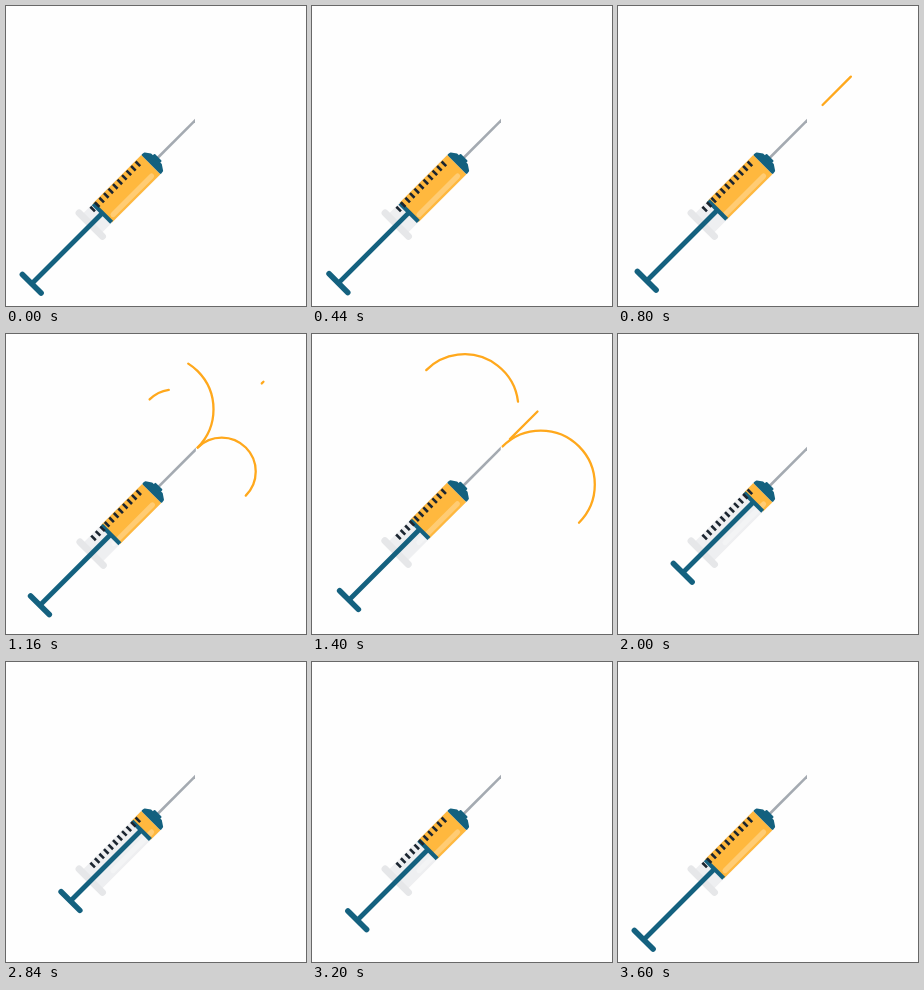
These frames come from a looping animation (300x300 px, 4.08 s). An HTML page with a canvas:

```html
<!DOCTYPE html>
<html lang="en">
<head>
<meta charset="utf-8">
<title>Syringe</title>
<style>
html, body { margin: 0; width: 100%; height: 100%; overflow: hidden; background: #fefefe; }
canvas { display: block; width: 300px; height: 300px; }
</style>
</head>
<body>
<canvas id="stage" width="300" height="300"></canvas>
<script>
const ctx = document.getElementById('stage').getContext('2d');
const LOOP = 4080, STEP = 40;
const TEAL = '#14617f', LIQUID = '#ffb83e', JET = '#ffa81c', INK = '#1b2530';
const TRAVEL = 55.2, HALF = 13.5, CAP = -62.4;

// Jets grow from the tip for GROW ms, wait, then their tail follows for FADE ms.
// When the syringe runs dry every tail sets off.
const GROW = 245, FADE = 235, DRY = 1760;
const JETS = [
  { side: 0, size: 93, starts: [487], lag: 215, pace: 2 },
  { side: 0, size: 93, starts: [1270], lag: 104 },
  { side: -1, size: 34, starts: [880, 1408], lag: 93 },
  { side: 1, size: 34, starts: [910, 1470], lag: 255 },
  { side: -1, size: 54, starts: [1020, 1440], lag: 312 },
  { side: 1, size: 54, starts: [1155, 1679], lag: 250 }
];

const clamp = x => Math.max(0, Math.min(1, x));
const smooth = x => x * x * (3 - 2 * x);
const span = (t, from, to) => clamp((t - from) / (to - from));

// A slow squeeze, then a shove, later an even refill
function pushed(t) {
  if (t >= 2800) return 1 - smooth(span(t, 2800, 3600));
  return .295 * span(t, 40, 1400) ** 2.3 + .705 * smooth(span(t, 1400, 2000) ** 1.1);
}

function shake(t) {
  return t > 980 && t < 1900 ? .4 + .8 * Math.cos((t - 1160) / 560 * 2 * Math.PI) : 0;
}

function line(x1, y1, x2, y2, color, width, cap = 'butt') {
  ctx.strokeStyle = color;
  ctx.lineWidth = width;
  ctx.lineCap = cap;
  ctx.beginPath();
  ctx.moveTo(x1, y1);
  ctx.lineTo(x2, y2);
  ctx.stroke();
}

function shape(pts, color, round = 0) {
  ctx.beginPath();
  pts.forEach(p => ctx.lineTo(p[0], p[1]));
  ctx.closePath();
  ctx.fillStyle = color;
  ctx.fill();
  if (round) {
    ctx.strokeStyle = color;
    ctx.lineWidth = round;
    ctx.lineJoin = 'round';
    ctx.stroke();
  }
}

// side 0 is a straight squirt, -1 and 1 are half circles to either side
function drawJet({ side, size, lag, pace = 1 }, start, t) {
  const leave = Math.min(start + lag, DRY);
  const head = span(t, start, start + GROW * pace);
  const tail = span(t, leave, leave + FADE * pace);
  if (head <= tail) return;
  const x = 2.6;
  if (!side) return line(x + tail * size, 0, x + head * size, 0, JET, 2.3, 'round');
  const angle = p => side * Math.PI * (p - .5);
  ctx.strokeStyle = JET;
  ctx.lineWidth = 2.3;
  ctx.lineCap = 'round';
  ctx.beginPath();
  ctx.arc(x, side * size, size, angle(tail), angle(head), side < 0);
  ctx.stroke();
}

function drawSyringe(move) {
  const piston = -130.9 + move, handle = -230.9 + move;

  shape([[-53, -1.3], [1.3, -1.3], [-1.3, 1.3], [-53, 1.3]], '#a4aab1');

  // Barrel, liquid and highlight
  ctx.fillStyle = '#eeeff1';
  ctx.fillRect(-147, -HALF, 147 + CAP, 2 * HALF);
  line(-147.4, -16.5, -147.4, 16.5, '#e6e7e9', 7, 'round');
  ctx.fillStyle = LIQUID;
  ctx.fillRect(piston, -HALF, CAP - piston, 2 * HALF);
  line(-124.5, 8.6, -70, 8.6, 'rgba(255,255,255,.28)', 5.2, 'round');

  // Plunger
  line(handle, 0, piston, 0, TEAL, 4.8);
  line(handle, -13.2, handle, 13.2, TEAL, 5.6, 'round');
  line(piston, -13, piston, 13, TEAL, 4.2);

  // Scale
  for (let i = 0; i < 11; i++) {
    const x = -135 + i * 6.4;
    line(x, -13, x, -6.5, INK, 2.6);
  }

  // Cap
  shape([[CAP + 1.2, -12.5], [-59, -12.2], [-55.5, -7], [-55.5, 7],
         [-59, 12.2], [CAP + 1.2, 12.5]], TEAL, 2.4);
  shape([[-57, -4.2], [-53, -4.2], [-53, 4.2], [-57, 4.2]], TEAL, 2);
}

function draw(t) {
  ctx.setTransform(1, 0, 0, 1, 0, 0);
  ctx.fillStyle = '#fefefe';
  ctx.fillRect(0, 0, 300, 300);

  // Origin at the needle tip, x along the needle
  ctx.translate(189, 114.5);
  ctx.rotate(-Math.PI / 4);
  ctx.translate(0, shake(t));

  drawSyringe(pushed(t) * TRAVEL);
  JETS.forEach(jet => jet.starts.forEach(start => drawJet(jet, start, t)));
}

const begin = performance.now();
function frame() {
  const t = (performance.now() - begin) % LOOP;
  draw(Math.floor(t / STEP) * STEP);
  requestAnimationFrame(frame);
}
frame();
</script>
</body>
</html>
```
